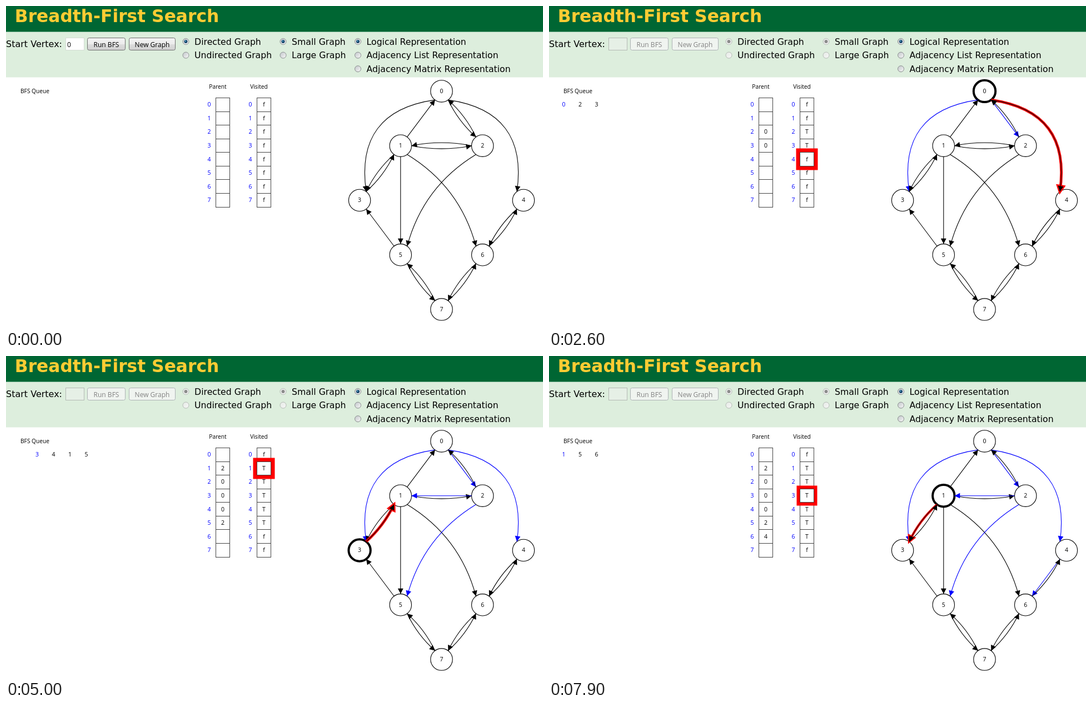
Animation of 966 by 580 pixels, one loop 8000 ms. Source, as an HTML page with a canvas:

```html
<!DOCTYPE html>
<html lang="en">
<head>
<meta charset="utf-8">
<title>Breadth-First Search</title>
<style>
html, body { margin: 0; width: 100%; height: 100%; overflow: hidden; background: #fff; }
canvas { display: block; }
</style>
</head>
<body>
<canvas id="stage" width="966" height="580"></canvas>
<script>
const ctx = document.getElementById('stage').getContext('2d');
const LOOP = 8000, STEP = 100, R = 19.7, ROW = 24.58;
const BLUE = '#0000ff', RED = '#ff0000', BLACK = '#000';
const UI = '"DejaVu Sans", sans-serif', SMALL = '"Open Sans", "Noto Sans", sans-serif';

const nodes = [[1, 0], [0, 1], [2, 1], [-1, 2], [3, 2], [0, 3], [2, 3], [1, 4]]
  .map(([c, r]) => ({ x: 709.8 + c * 73.7, y: 153.4 + r * 98.3 }));
const adjacent = [[2, 3, 4], [0, 2, 3, 5, 6], [0, 1, 5], [1], [6], [3, 7], [4, 7], [5, 6]];
const bends = { '0-3': 0.5, '0-4': -0.5, '1-6': -0.2, '2-5': 0.2 };

// start time, vertex, neighbour, highlight size per step
const probes = [
  [1000, 0, 2, [4.5, 5.5, 6.5]],
  [1700, 0, 3, [5.5, 6.5, 6.5]],
  [2400, 0, 4, [4.5, 5.5, 6.5]],
  [3100, 2, 0, [5.5, 6.5, 5.5]],
  [3700, 2, 1, [4.5, 5.5, 6.5]],
  [4400, 2, 5, [5.5, 6.5, 5.5]],
  [5000, 3, 1, [6.5, 5.5, 4.5, 5.5]],
  [5700, 4, 6, [4.5, 5.5, 6.5]],
  [6400, 1, 0, [5.5, 6.5, 5.5]],
  [7000, 1, 2, [4.5, 4, 4.5, 5]],
  [7700, 1, 3, [6, 6.5, 5.5]]
];

function stateAt(t) {
  const s = { queue: [], slide: 0, parent: {}, vertex: -1, probe: null };
  for (const [start, vertex, to, sizes] of probes) {
    if (t < start) break;
    const k = Math.floor((t - start) / STEP);
    if (s.vertex < 0) {
      s.queue = [vertex];
    } else if (vertex !== s.vertex) {
      s.queue.shift();
      s.slide = Math.max(0, 1 - k * 0.4);
    }
    s.vertex = vertex;
    if (k < sizes.length) {
      s.probe = { from: vertex, to, size: sizes[k] };
    } else if (to !== 0 && !(to in s.parent)) {
      s.parent[to] = vertex;
      s.queue.push(to);
    }
  }
  return s;
}

function text(str, x, y, size, color = BLACK, family = SMALL, align = 'center', weight = '') {
  ctx.font = `${weight} ${size}px ${family}`;
  ctx.fillStyle = color;
  ctx.textAlign = align;
  ctx.fillText(str, x, y);
}

const note = (str, x, y, size, color) => text(str, x, y, size, color, SMALL, 'center', 500);

function disc(x, y, r, fill, stroke, width = 1) {
  ctx.beginPath();
  ctx.arc(x, y, r, 0, Math.PI * 2);
  ctx.fillStyle = fill;
  ctx.fill();
  if (!stroke) return;
  ctx.strokeStyle = stroke;
  ctx.lineWidth = width;
  ctx.stroke();
}

function button(label, x, w, mode) {
  const [border, top, mid, low, end, ink] = {
    idle: ['#707070', '#f3f3f3', '#ebebeb', '#dddddd', '#cfcfcf', BLACK],
    hot: ['#3c7fb1', '#eaf6fd', '#d9f0fc', '#bee6fd', '#a7d9f5', BLACK],
    off: ['#adb2b5', '#f0f4f0', '#f0f4f0', '#f0f4f0', '#f0f4f0', '#838383']
  }[mode];
  const g = ctx.createLinearGradient(0, 58, 0, 80);
  [[0, top], [0.5, mid], [0.5, low], [1, end]].forEach(([p, c]) => g.addColorStop(p, c));
  ctx.beginPath();
  ctx.roundRect(x + 0.5, 57.5, w - 1, 22, 3);
  ctx.fillStyle = g;
  ctx.fill();
  ctx.strokeStyle = border;
  ctx.lineWidth = 1;
  ctx.stroke();
  text(label, x + w / 2, 73.5, 12, ink);
}

function radio(label, x, row, checked, off) {
  const y = 64 + row * 24.6;
  const g = ctx.createLinearGradient(x - 5, y - 5, x + 5, y + 5);
  g.addColorStop(0, off ? '#e6ebe6' : '#c4c8cc');
  g.addColorStop(1, '#f6f6f6');
  disc(x, y, 5.5, g, off ? '#b4bab4' : '#8a8f8f');
  if (checked) disc(x, y, 3, off ? '#8c8c8c' : '#15456b');
  if (checked && !off) disc(x - 0.6, y - 0.8, 1.1, '#5fb2d8');
  text(label, x + 15.6, y + 5.8, 15.7, BLACK, UI, 'left');
}

function drawControls(t) {
  const off = t >= 1000;
  ctx.fillStyle = '#ddeedd';
  ctx.fillRect(0, 0, 966, 128.5);
  ctx.fillStyle = '#006633';
  ctx.fillRect(0, 0, 966, 46.5);
  text('Breadth-First Search', 15.8, 29, 31.3, '#ffcc33', UI, 'left', 'bold');
  text('Start Vertex:', 0, 74, 16, BLACK, UI, 'left');

  ctx.fillStyle = off ? '#e6f0e6' : '#fff';
  ctx.fillRect(107, 57, 34, 23);
  ctx.strokeStyle = off ? '#b4bab4' : '#d4dcd4';
  ctx.lineWidth = 1;
  ctx.strokeRect(107.5, 57.5, 33, 22);
  if (!off) text('0', 110, 74, 12, BLACK, SMALL, 'left');

  button('Run BFS', 146, 69, off ? 'off' : t >= 800 ? 'hot' : 'idle');
  button('New Graph', 221, 84, off ? 'off' : 'idle');
  radio('Directed Graph', 323.5, 0, true, off);
  radio('Undirected Graph', 323.5, 1, false, off);
  radio('Small Graph', 498.5, 0, true, off);
  radio('Large Graph', 498.5, 1, false, off);
  radio('Logical Representation', 633, 0, true);
  radio('Adjacency List Representation', 633, 1, false);
  radio('Adjacency Matrix Representation', 633, 2, false);
}

function drawCell(x, i, value, glow = 0) {
  const top = Math.round(165 + i * ROW) + 0.5;
  const height = Math.round(165 + (i + 1) * ROW) + 0.5 - top;
  if (glow) {
    const m = glow + 0.5;
    ctx.fillStyle = RED;
    ctx.fillRect(x - 12.5 - m, top - m, 25 + m * 2, height + m * 2);
    ctx.fillStyle = '#fff';
    ctx.fillRect(x - 12.5, top, 25, height);
  }
  ctx.strokeStyle = '#444';
  ctx.lineWidth = 1;
  ctx.strokeRect(x - 12.5, top, 25, height);
  note(value, x, 181.3 + i * ROW, 10.5);
}

function drawColumn(title, x, value) {
  note(title, x - 9, 148.5, 10.2);
  for (let i = 0; i < 8; i++) {
    drawCell(x, i, value(i));
    note(i, x - 24.5, 181.3 + i * ROW, 10.5, BLUE);
  }
}

function drawTables(s) {
  const flag = i => i in s.parent ? 'T' : 'f';
  note('BFS Queue', 52, 156.5, 10.2);
  s.queue.forEach((v, i) =>
    note(v, 26.5 + (i + s.slide) * 29.5, 181, 10.5, i ? BLACK : BLUE));
  drawColumn('Parent', 390, i => i in s.parent ? s.parent[i] : '');
  drawColumn('Visited', 464, flag);
  if (s.probe) drawCell(464, s.probe.to, flag(s.probe.to), s.probe.size);
}

function drawArrow(from, to, bend, color, width, outline) {
  const a = nodes[from], b = nodes[to];
  const len = Math.hypot(b.x - a.x, b.y - a.y);
  const ux = (b.x - a.x) / len, uy = (b.y - a.y) / len;
  const x1 = a.x + ux * R, y1 = a.y + uy * R;
  const x2 = b.x - ux * R, y2 = b.y - uy * R;
  const cx = (x1 + x2) / 2 - (y2 - y1) * bend;
  const cy = (y1 + y2) / 2 + (x2 - x1) * bend;
  ctx.strokeStyle = ctx.fillStyle = color;
  ctx.lineWidth = width;
  ctx.beginPath();
  ctx.moveTo(x1, y1);
  ctx.quadraticCurveTo(cx, cy, x2, y2);
  ctx.stroke();

  const d = Math.hypot(cx - x2, cy - y2);
  const vx = (cx - x2) / d * 9.8, vy = (cy - y2) / d * 9.8;
  ctx.beginPath();
  ctx.moveTo(x2, y2);
  ctx.lineTo(x2 + vx - vy / 2, y2 + vy + vx / 2);
  ctx.lineTo(x2 + vx + vy / 2, y2 + vy - vx / 2);
  ctx.closePath();
  ctx.fill();
  if (outline) ctx.stroke();
}

function drawEdge(from, to, s) {
  const tree = s.parent[to] === from;
  const mutual = adjacent[to].includes(from);
  const bend = bends[from + '-' + to] || (mutual && !tree ? 0.1 : 0);
  const p = s.probe;
  if (p && p.from === from && p.to === to) {
    drawArrow(from, to, bend, RED, p.size * 0.75, true);
  }
  drawArrow(from, to, bend, tree ? BLUE : BLACK, 1.1);
}

function drawGraph(s) {
  nodes.forEach((n, i) => {
    disc(n.x, n.y, R, '#fff', BLACK, i === s.vertex ? 4 : 1.1);
    note(i, n.x, n.y + 3.3, 10.5);
  });
  adjacent.forEach((list, from) => list.forEach(to => drawEdge(from, to, s)));
}

function render(now) {
  const t = Math.floor(now % LOOP / STEP) * STEP;
  const s = stateAt(t);
  ctx.fillStyle = '#fff';
  ctx.fillRect(0, 0, 966, 580);
  drawControls(t);
  drawTables(s);
  drawGraph(s);
}

const begin = performance.now();
function tick() {
  render(performance.now() - begin);
  requestAnimationFrame(tick);
}
tick();
</script>
</body>
</html>
```
